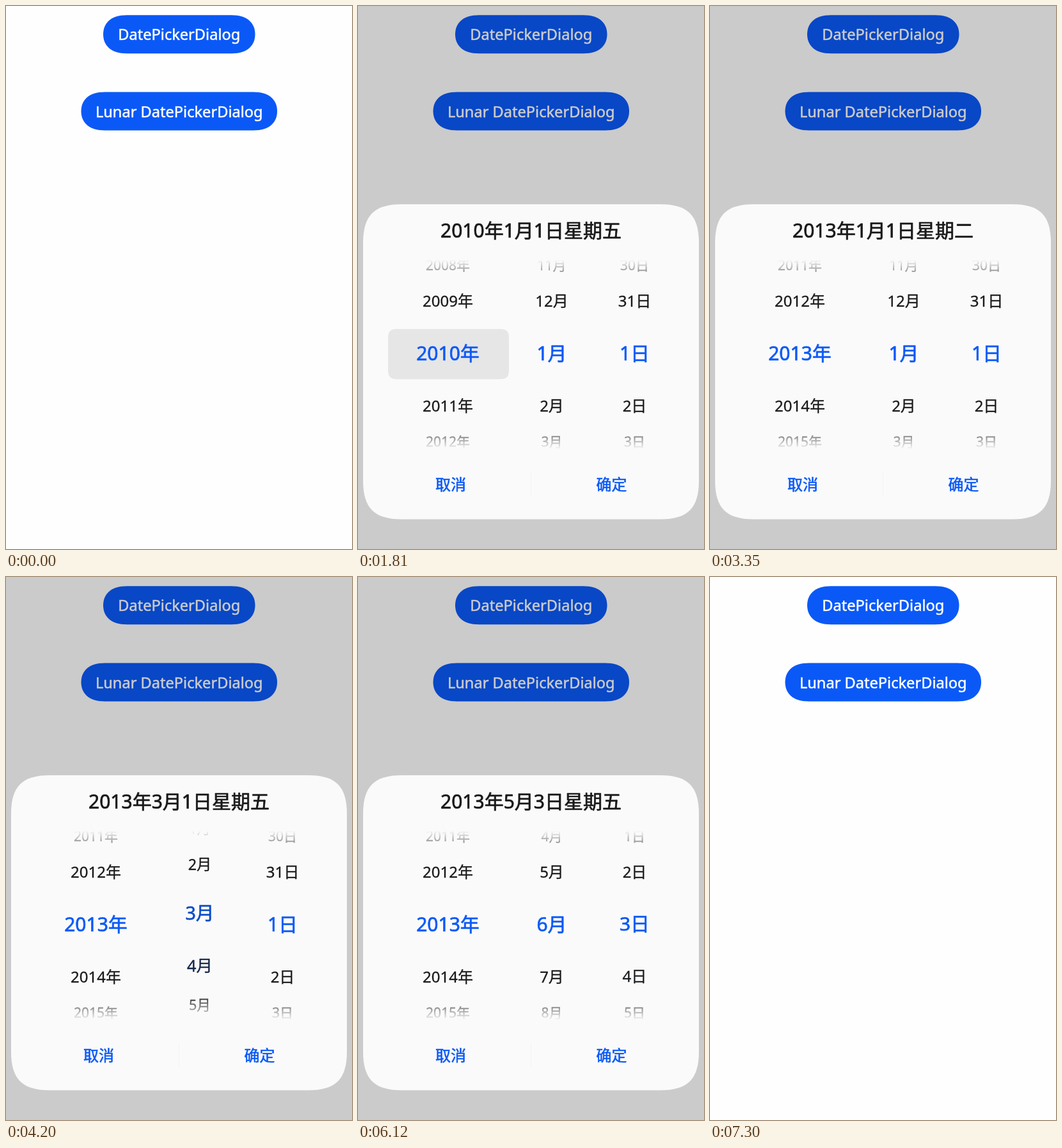
Recreate the animation shown at these times as an HTML page with a canvas. Size 541 px wide and 849 px high, loop 8 s.

```html
<!DOCTYPE html>
<html lang="zh-CN">
<head>
<meta charset="utf-8">
<title>Date picker</title>
<style>
  html, body { margin: 0; width: 100%; height: 100%; overflow: hidden; background: #fefefe; }
  canvas { display: block; width: 541px; height: 849px; }
</style>
</head>
<body>
<canvas id="stage"></canvas>
<script>
const W = 541, H = 849, LOOP = 8000;
const FONT = '"Noto Sans", "Noto Sans CJK SC", sans-serif';
const BLUE = [10, 89, 247], INK = [25, 25, 25], PANEL = '250,250,250';
const LIST = { top: 397, mid: 543.5, bottom: 693, fade: 40 };
const DPR = window.devicePixelRatio || 1;

const clamp = v => Math.min(1, Math.max(0, v));
const mix = (a, b, k) => a + (b - a) * k;
const ramp = (t, from, to) => clamp((t - from) / (to - from));
const swing = k => 0.5 - 0.5 * Math.cos(Math.PI * k);
const outCubic = k => 1 - (1 - k) ** 3;
const wrap = (n, size) => ((n - 1) % size + size) % size + 1;
const rgb = c => `rgb(${c.map(Math.round).join()})`;

// Each swipe: start, end, resting value afterwards.
const YEAR = { first: 2010, swipes: [
  [1880, 2200, 2011], [2200, 2530, 2012], [2610, 3030, 2012.97], [3150, 3350, 2013]] };
const MONTH = { first: 1, swipes: [
  [3460, 3750, 2], [3750, 4050, 3], [4120, 4380, 4], [4430, 4960, 5], [5000, 5674, 6]] };
const DAY = { first: 1, swipes: [
  [5140, 5479, 2], [5490, 6050, 3], [6080, 6670, 4], [6700, 7045, 5]] };

function position({ first, swipes }, t) {
  let v = first;
  for (const [from, to, end] of swipes) {
    if (t < from) break;
    v = mix(v, end, swing(ramp(t, from, to)));
  }
  return v;
}

function makeLayer(canvas) {
  canvas.width = W * DPR;
  canvas.height = H * DPR;
  const ctx = canvas.getContext('2d');
  ctx.scale(DPR, DPR);
  ctx.textAlign = 'center';
  ctx.lineJoin = 'round';
  return ctx;
}

const stage = makeLayer(document.getElementById('stage'));
const layer = makeLayer(document.createElement('canvas'));

// Rectangle with smoothed corners of nominal radius r.
function smoothRect(ctx, x, y, w, h, r, fill) {
  const ex = Math.min(1.25 * r, w / 2), ey = Math.min(1.25 * r, h / 2);
  const cx = (2.343 * r - ex) / 3, cy = (2.343 * r - ey) / 3;
  const R = x + w, B = y + h;
  ctx.beginPath();
  ctx.moveTo(x + ex, y);
  ctx.lineTo(R - ex, y);
  ctx.bezierCurveTo(R - cx, y, R, y + cy, R, y + ey);
  ctx.lineTo(R, B - ey);
  ctx.bezierCurveTo(R, B - cy, R - cx, B, R - ex, B);
  ctx.lineTo(x + ex, B);
  ctx.bezierCurveTo(x + cx, B, x, B - cy, x, B - ey);
  ctx.lineTo(x, y + ey);
  ctx.bezierCurveTo(x, y + cy, x + cx, y, x + ex, y);
  ctx.fillStyle = fill;
  ctx.fill();
}

// Text centred on (x, y); weight is the extra outline thickness.
function label(ctx, str, x, y, size, color, weight) {
  ctx.font = `400 ${size}px ${FONT}`;
  ctx.fillStyle = ctx.strokeStyle = color;
  ctx.lineWidth = weight;
  const base = y + size * 0.365;
  ctx.fillText(str, x, base);
  ctx.strokeText(str, x, base);
}

function column(x, pos, format) {
  const near = Math.round(pos);
  for (let n = near - 3; n <= near + 3; n++) {
    const d = n - pos, a = Math.abs(d);
    const inner = Math.min(a, 1), outer = clamp(a - 1);
    const y = LIST.mid + Math.sign(d) * (82 * inner + 56 * Math.max(0, a - 1));
    const size = 30 - 6 * inner - 3 * outer;
    const color = rgb(BLUE.map((c, i) => mix(c, INK[i], inner)));
    label(layer, format(n), x, y, size, color, mix(0.7, 0.3, inner));
  }
}

function fadeEdge(edge, inward) {
  const end = edge + inward;
  const g = layer.createLinearGradient(0, edge, 0, end);
  g.addColorStop(0, `rgba(${PANEL},1)`);
  g.addColorStop(1, `rgba(${PANEL},0)`);
  layer.fillStyle = g;
  layer.fillRect(40, Math.min(edge, end), 461, LIST.fade);
}

function drawDialog(t) {
  const year = position(YEAR, t), month = position(MONTH, t), day = position(DAY, t);
  const settled = v => Math.floor(v + 0.04);
  const y = settled(year), m = Math.min(5, settled(month)), d = settled(day);
  const date = new Date(y, m - 1, d);
  const monthDays = new Date(y, m, 0).getDate();

  layer.clearRect(0, 0, W, H);
  smoothRect(layer, 8, 310, 525, 492.5, 48, `rgb(${PANEL})`);
  label(layer, `${y}年${m}月${d}日星期${'日一二三四五六'[date.getDay()]}`,
    270.5, 351.5, 30, rgb(INK), 0.7);

  if (t >= 1810 && t < 1970) {
    layer.globalAlpha = 1 - ramp(t, 1890, 1970);
    smoothRect(layer, 47, 505, 189, 78.5, 11, '#e6e6e6');
    layer.globalAlpha = 1;
  }

  layer.save();
  layer.beginPath();
  layer.rect(40, LIST.top, 461, LIST.bottom - LIST.top);
  layer.clip();
  column(140.5, year, n => n + '年');
  column(303, month, n => wrap(n, 12) + '月');
  column(432.5, day, n => wrap(n, monthDays) + '日');
  fadeEdge(LIST.top, LIST.fade);
  fadeEdge(LIST.bottom, -LIST.fade);
  layer.restore();

  layer.fillStyle = '#f3f3f3';
  layer.fillRect(270, 730, 1, 36);
  label(layer, '取消', 145, 748, 24, rgb(BLUE), 0.6);
  label(layer, '确定', 396.5, 748, 24, rgb(BLUE), 0.6);
}

function pill(text, x, y, w) {
  smoothRect(stage, x, y, w, 60, 30, rgb(BLUE));
  label(stage, text, x + w / 2, y + 30.5, 23.6, '#fff', 0.5);
}

function draw(t) {
  stage.globalAlpha = 1;
  stage.fillStyle = '#fefefe';
  stage.fillRect(0, 0, W, H);
  pill('DatePickerDialog', 152, 14.3, 237.5);
  pill('Lunar DatePickerDialog', 117.5, 134.5, 306.5);

  const opening = t < 4000;
  const shown = opening ? ramp(t, 710, 1040) : 1 - ramp(t, 7050, 7300);
  if (shown <= 0) return;

  const alpha = opening ? ramp(t, 710, 900) : shown;
  const scale = mix(0.85, 1, opening ? outCubic(shown) : swing(shown));
  stage.fillStyle = `rgba(0,0,0,${0.2 * alpha})`;
  stage.fillRect(0, 0, W, H);

  drawDialog(t);
  stage.save();
  stage.globalAlpha = alpha;
  if (scale < 1) {
    stage.translate(270.5, 556);
    stage.scale(scale, scale);
    stage.translate(-270.5, -556);
  }
  stage.drawImage(layer.canvas, 0, 0, W, H);
  stage.restore();
}

const start = performance.now();
function tick() {
  draw((performance.now() - start) % LOOP);
  requestAnimationFrame(tick);
}
tick();
</script>
</body>
</html>
```
